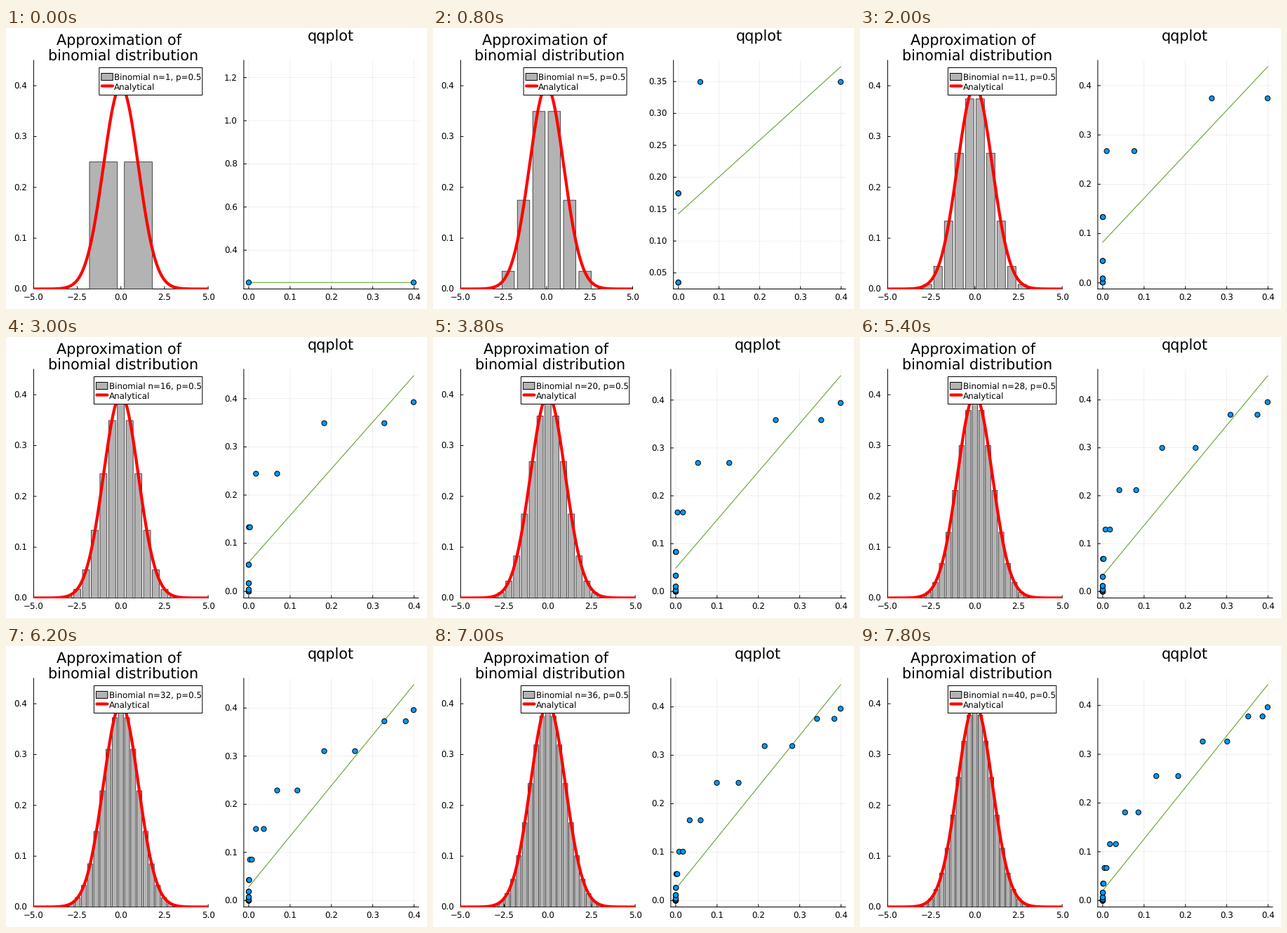
Write a matplotlib script that moves like this. It is 600 px wide and 400 px high and loops after 8000 ms.

```python
import math

import matplotlib.pyplot as plt
import numpy as np
from matplotlib.animation import FuncAnimation
from matplotlib.patches import Rectangle

W, H, DPI = 600, 400, 100
PX = 72 / DPI                      # points per pixel
SMALL, LARGE = 8 * 16 / 15, 14 * 16 / 15
TOP, BOTTOM = 46, 371.5
LEFT, RIGHT = 39.4, 588
N_MAX = 40

plt.rcParams.update({
    "font.family": "DejaVu Sans",
    "text.hinting": "none",
    "axes.linewidth": PX,
    "axes.unicode_minus": True,
    "path.snap": False,
})

fig = plt.figure(figsize=(W / DPI, H / DPI), dpi=DPI, facecolor="white")


def normal_pdf(x):
    return np.exp(-x ** 2 / 2) / math.sqrt(2 * math.pi)


def nice_ticks(lo, hi):
    """Pick the step with the best mix of count, coverage and roundness."""
    span = hi - lo
    best, choice = -1, None
    for power in (0, -1, -2):
        for base, nice in ((1, 1), (5, 0.9), (2, 0.7), (2.5, 0.5), (3, 0.2)):
            step = base * 10.0 ** power
            first, last = math.ceil(lo / step), math.floor(hi / step)
            count = last - first + 1
            if not 4 <= count <= 8:
                continue
            score = (0.25 * (1 - abs(count - 5) / 5)
                     + (hi / step <= 15) / 6
                     + 0.5 * span / ((count - 1) * step)
                     + 0.25 * nice)
            if score > best:
                best, choice = score, np.arange(first, last + 1) * step
    return choice


def tick_labels(ticks):
    coarse = np.allclose(ticks, np.round(ticks, 1))
    return [f"{t:.{1 if coarse else 2}f}".replace("-", "\u2212") for t in ticks]


def panel(x0, x1, xlim, ylim, xticks, yticks):
    w, h = x1 - x0, BOTTOM - TOP
    ax = fig.add_axes([x0 / W, 1 - BOTTOM / H, w / W, h / H])
    ax.set(xlim=xlim, ylim=ylim)
    ax.set_xticks(xticks, tick_labels(xticks))
    ax.set_yticks(yticks, tick_labels(yticks))
    ax.spines[["top", "right"]].set_visible(False)
    ax.tick_params(length=0, labelsize=SMALL)
    ax.tick_params(axis="x", pad=7.2 * PX)
    ax.tick_params(axis="y", pad=9 * PX)
    # inward tick marks, free of pixel rounding
    style = dict(color="black", lw=PX, clip_on=False, zorder=2.5)
    ax.vlines(xticks, 0, 4 / h, transform=ax.get_xaxis_transform(), **style)
    ax.hlines(yticks, 0, 4 / w, transform=ax.get_yaxis_transform(), **style)
    return ax


def widen(lo, hi):
    if hi - lo < 1e-9:
        hi = lo + 1
    pad = 0.03 * (hi - lo)
    return lo - pad, hi + pad


def draw_bars(n, pos, heights, right):
    ax = panel(LEFT, right, (-5, 5), (0, 0.45),
               np.linspace(-5, 5, 5), np.arange(5) * 0.1)
    ax.bar(pos, heights, width=1.6 / math.sqrt(n), color="#b3b3b3",
           edgecolor="#262626", linewidth=0.8 * PX, zorder=2.6)
    x = np.linspace(-5, 5, 501)
    ax.plot(x, normal_pdf(x), color="red", lw=4.2 * PX, zorder=3)
    ax.set(xlim=(-5, 5), ylim=(0, 0.45))


def draw_qq(qx, qy, line_x, line_y, ylim, yticks, left):
    xlim = widen(*line_x)
    ax = panel(left, RIGHT, xlim, ylim, nice_ticks(*xlim), yticks)
    ax.set_axisbelow(True)
    ax.grid(color="black", alpha=0.1, lw=0.6 * PX)
    ax.plot(line_x, line_y, color="#64a032", lw=1.1 * PX, zorder=3)
    # one size per dot keeps sub-pixel positions
    ax.scatter(qx, qy, s=np.full(len(qx), (7.2 * PX) ** 2), c="#009af9",
               edgecolors="black", linewidths=PX, zorder=4)
    ax.set(xlim=xlim, ylim=ylim)


def draw_legend(ax, n, right):
    left = right - (147 if n < 10 else 154.4)
    ax.add_patch(Rectangle((left, 56.5), right - left, 39, fc="white",
                           ec="black", lw=PX))
    ax.add_patch(Rectangle((left + 3, 64.5), 16.5, 10, fc="#b3b3b3",
                           ec="black", lw=PX))
    ax.plot([left + 4, left + 19], [82.5, 82.5], color="red", lw=4.2 * PX,
            solid_capstyle="round")
    ax.text(left + 21.3, 74, f"Binomial n={n}, p=0.5", size=SMALL)
    ax.text(left + 21.3, 87, "Analytical", size=SMALL)


def draw(i):
    n = i + 1
    fig.clear()

    k = np.arange(n + 1)
    pos = (2 * k - n) / math.sqrt(n)
    heights = np.array([math.comb(n, j) / 2 ** n for j in k]) * math.sqrt(n) / 2

    # quantiles of the density on [-10, 10] against those of the bar heights
    qx = normal_pdf(10 * (1 - k / n))
    qy = np.sort(heights)
    slope, offset = np.polyfit(qx, qy, 1)
    line_x = np.array([qx[0], qx[-1]])
    line_y = slope * line_x + offset
    ylim = widen(min(qy[0], line_y.min()), max(qy[-1], line_y.max()))
    yticks = nice_ticks(*ylim)

    # two-decimal tick labels push the panels apart
    wide = len(tick_labels(yticks)[0]) > 3
    right, left = (284.4, 342.7) if wide else (288.1, 338.9)

    draw_bars(n, pos, heights, right)
    draw_qq(qx, qy, line_x, line_y, ylim, yticks, left)

    top = fig.add_axes([0, 0, 1, 1], zorder=5)
    top.set(xlim=(0, W), ylim=(H, 0))
    top.axis("off")
    draw_legend(top, n, right - 8.3)
    mid = (LEFT + right) / 2
    top.text(mid - 2.9, 25, "Approximation of", size=LARGE, ha="center")
    top.text(mid + 3.7, 47, "binomial distribution", size=LARGE, ha="center")
    top.text((left + RIGHT) / 2 - 0.6, 19, "qqplot", size=LARGE, ha="center")
    return []


anim = FuncAnimation(fig, draw, frames=N_MAX, interval=200, repeat=True,
                     repeat_delay=0, blit=False)
plt.show()
```
